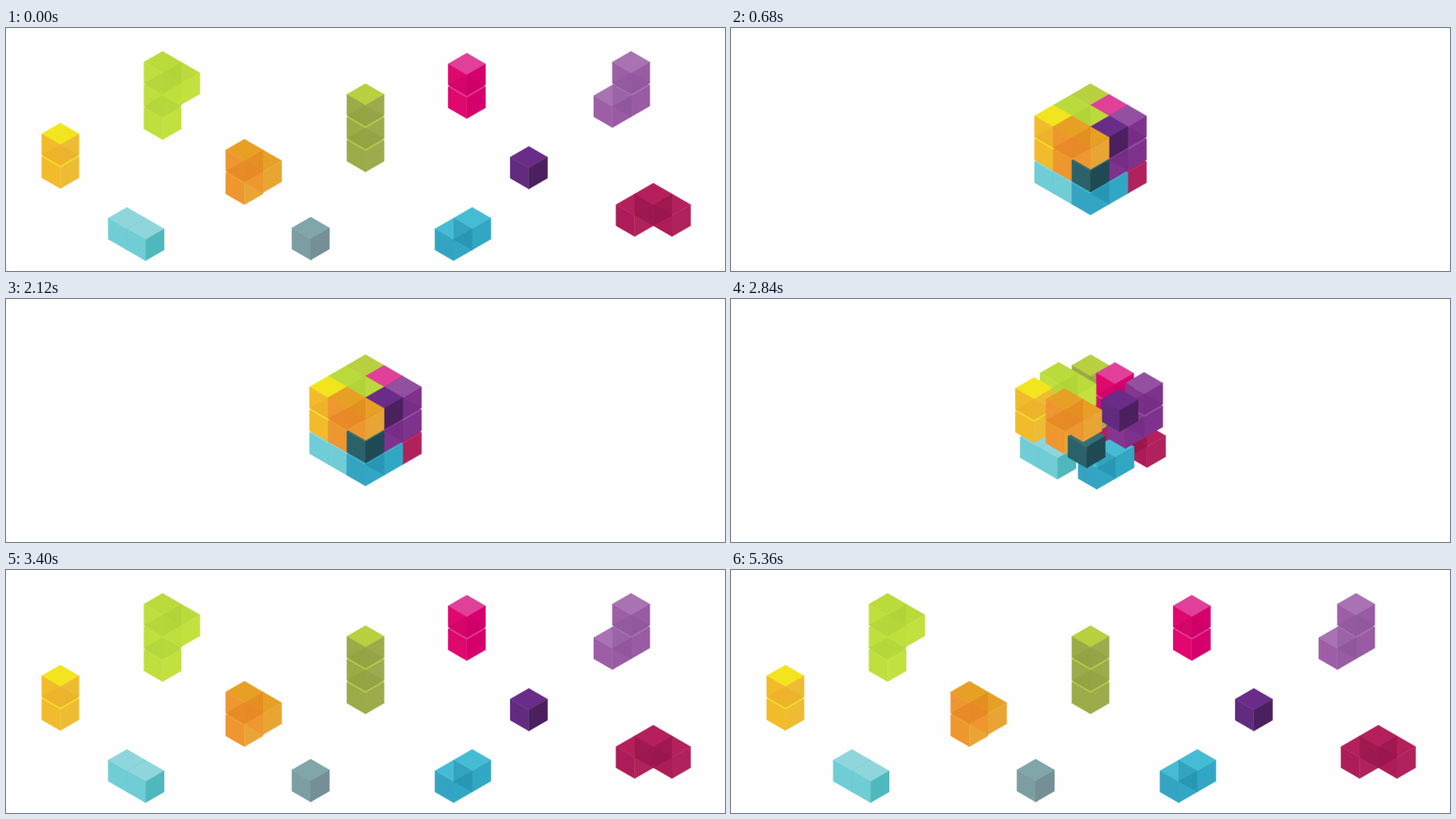
Write an HTML page that moves like this. It is 800 px wide and 271 px high and loops after 5400 ms.

```html
<!DOCTYPE html>
<html lang="en">
<head>
<meta charset="utf-8">
<title>Puzzle cube</title>
<style>
  html, body { margin: 0; width: 100%; height: 100%; overflow: hidden; background: #fefefe; }
  svg { display: block; width: 800px; height: 271px; }
</style>
</head>
<body>
<svg id="stage" viewBox="0 0 800 271"><g id="cube"></g></svg>
<script>
const LOOP = 5400, STEP = 40, TURN = 3360, TRAVEL = 560;
const PULSE_START = 680, PULSE_LENGTH = 400, PULSE_SIZE = 0.05;
const W = 20.75, H = 12, EDGE = 23.5, PITCH = 25.5;
const CENTER = [400, 135.5];

// cells: "ijk" with i to the lower right, j to the lower left, k down.
// away: offset when the puzzle is apart. colors: top, left, right, overlap.
const pieces = [
  { cells: '000 001 002', away: [0, 0], colors: ['#b9d040', '#9aab47', '#9dab4c', '#8c9c3e'] },
  { cells: '010 011 012 110', away: [-205, -48], colors: ['#badb3b', '#bfdf3e', '#c2e13f', '#a9cc38'] },
  { cells: '020 021', away: [-298, 20], colors: ['#f2e51e', '#f2bb2b', '#eebc33', '#e8a828'] },
  { cells: '120 220 121', away: [-114, 26], colors: ['#e8a024', '#ee9630', '#e9a534', '#e07a1e'] },
  { cells: '100 101', away: [92, -46], colors: ['#e0409a', '#e0076f', '#d6006c', '#c40462'] },
  { cells: '200 201 211', away: [254, -60], colors: ['#9450a0', '#85368f', '#7f328c', '#6b287d'], veil: 0.2 },
  { cells: '210', away: [161, 34], colors: ['#6a2c89', '#632b80', '#4b205e'] },
  { cells: '102 112 202', away: [299.5, 48], colors: ['#b5205c', '#ad1c58', '#b0225c', '#86103f'] },
  { cells: '022 122', away: [-224, 63], colors: ['#8fd6dc', '#70cdd6', '#4fb8bd'] },
  { cells: '222 212', away: [98, 51], colors: ['#46bcd4', '#35a4c2', '#31a7c4', '#1d86a4'] },
  { cells: '221', away: [-61, 75.5], colors: ['#327076', '#2b626a', '#1f4a54'], veil: 0.38 }
];

// Hexagon corners relative to the top corner of a cell.
const top_ = [0, 0], mid = [0, 2 * H], low = [0, 2 * H + EDGE];
const upLeft = [-W, H], upRight = [W, H];
const lowLeft = [-W, H + EDGE], lowRight = [W, H + EDGE];
const faces = [
  [top_, upRight, mid, upLeft],
  [upLeft, mid, low, lowLeft],
  [mid, upRight, lowRight, low]
];
const outline = [top_, upRight, lowRight, low, lowLeft, upLeft];
// Where a neighbour shines through the cell.
const overlaps = [
  { step: [-1, 0, 0], shape: [mid, top_, upLeft, lowLeft] },
  { step: [0, -1, 0], shape: [mid, top_, upRight, lowRight] },
  { step: [0, 0, 1], shape: [mid, lowLeft, low, lowRight] }
];

const cube = document.getElementById('cube');

function add(parent, name, attributes = {}) {
  const node = document.createElementNS('http://www.w3.org/2000/svg', name);
  for (const key in attributes) node.setAttribute(key, attributes[key]);
  return parent.appendChild(node);
}

function polygon(parent, points, fill, extra) {
  return add(parent, 'polygon', { points: points.join(' '), fill, ...extra });
}

function buildCell(piece, name) {
  const [i, j, k] = [...name].map(Number);
  const group = add(cube, 'g');
  faces.forEach((face, n) => {
    const color = piece.colors[n];
    polygon(group, face, color, { stroke: color, 'stroke-width': 0.4 });
  });
  for (const { step, shape } of overlaps) {
    const neighbour = `${i + step[0]}${j + step[1]}${k + step[2]}`;
    if (piece.colors[3] && piece.cells.includes(neighbour)) {
      polygon(group, shape, piece.colors[3], { 'fill-opacity': 0.45 });
    }
  }
  const veil = piece.veil && polygon(group, outline, '#fff', { stroke: '#fff', 'stroke-width': 0.4 });
  const x = CENTER[0] + W * (i - j);
  const y = 62 + H * (i + j) + PITCH * k;
  return { piece, group, veil, x, y };
}

// Bottom layer first, then back to front.
const depth = ([i, j, k]) => -10 * k + Number(i) + Number(j);
const cells = pieces
  .flatMap(piece => piece.cells.split(' ').map(name => ({ piece, name })))
  .sort((a, b) => depth(a.name) - depth(b.name))
  .map(({ piece, name }) => buildCell(piece, name));

const clamp = v => Math.min(1, Math.max(0, v));

function render(time) {
  // The second half of the motion runs backwards.
  const t = Math.min(time, Math.max(0, TURN - time));
  const joined = clamp(t / TRAVEL);
  const apart = 1 - joined;
  const scale = 1 + PULSE_SIZE * Math.sin(Math.PI * clamp((t - PULSE_START) / PULSE_LENGTH));
  const [cx, cy] = CENTER;
  cube.setAttribute('transform', `translate(${cx} ${cy}) scale(${scale}) translate(${-cx} ${-cy})`);
  for (const { piece, group, veil, x, y } of cells) {
    const [dx, dy] = piece.away;
    group.setAttribute('transform', `translate(${x + dx * apart} ${y + dy * apart})`);
    if (veil) veil.setAttribute('opacity', piece.veil * clamp(1 - 2 * joined));
  }
}

const start = performance.now();
function tick() {
  const time = (performance.now() - start) % LOOP;
  render(Math.floor(time / STEP) * STEP);
  requestAnimationFrame(tick);
}
tick();
</script>
</body>
</html>
```
